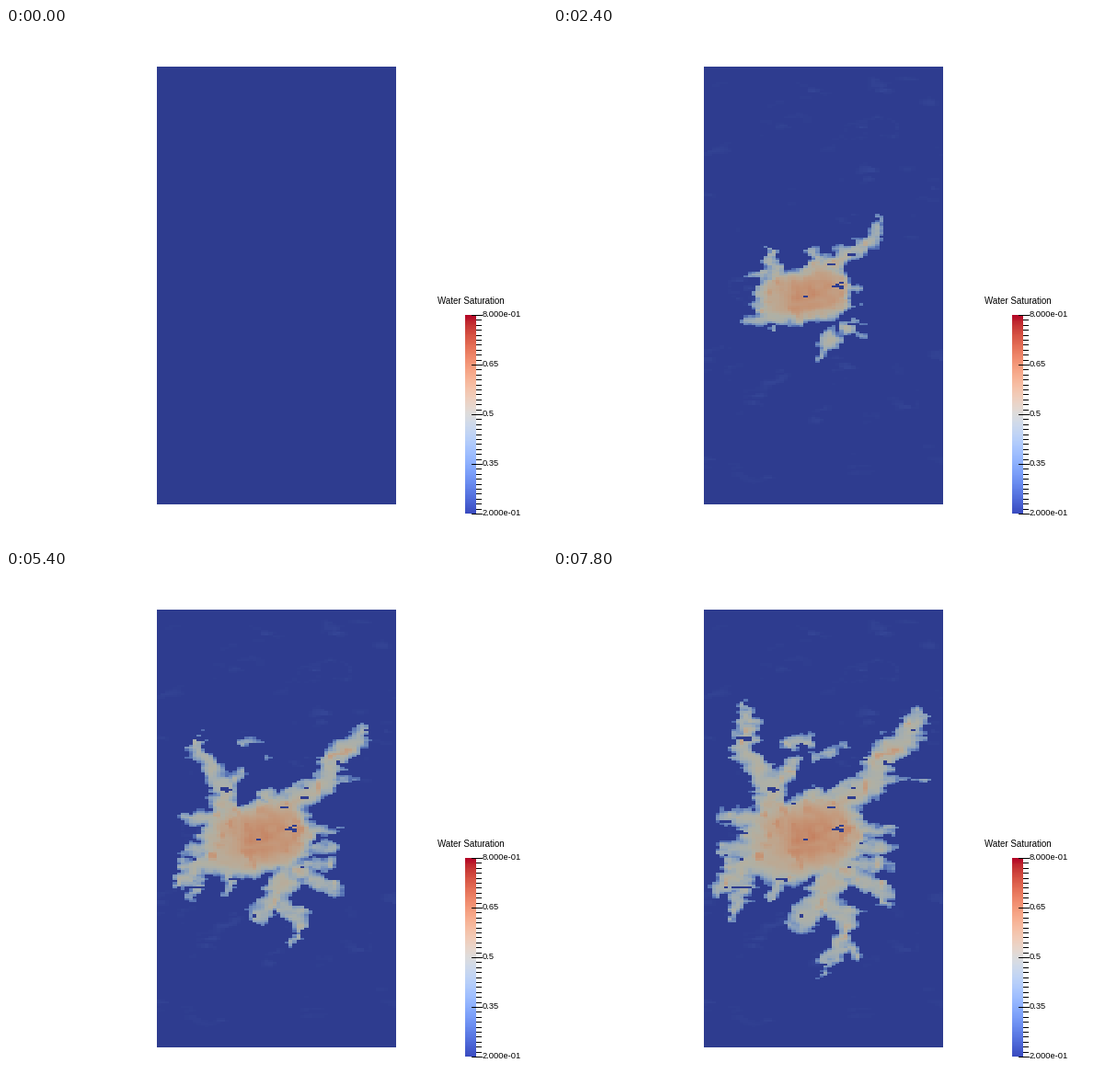
These frames come from a looping animation (588x560 px, 8 s). A matplotlib script:

```python
import numpy as np
import matplotlib.pyplot as plt
from matplotlib.animation import FuncAnimation

W, H, DPI = 588, 560, 100
LEFT, RIGHT, TOP, BOTTOM = 164, 424, 42, 518
COLS, ROWS = 60, 220
STEP_FRAMES, FRAMES, INTERVAL = 3, 80, 100
ROCK_TINT = np.array([0.80, 0.80, 0.745])
SPREAD_TIME = 6  # steps a front needs to widen to its branch's radius

# Flow paths: radius in pixels, then (x, y, step of arrival) along the way.
BRANCHES = [
    (29, [(295, 287, 0), (248, 295, 1.5)]),
    (12, [(296, 262, 2), (350, 226, 5), (356, 200, 9), (382, 184, 13), (400, 157, 23)]),
    (3, [(355, 228, 8), (402, 226, 22)]),
    (8, [(292, 262, 2), (286, 246, 4)]),
    (12, [(240, 268, 4), (234, 230, 9), (210, 196, 14), (209, 146, 25)]),
    (9, [(240, 236, 13), (262, 208, 20)]),
    (7, [(258, 186, 17), (275, 184, 18)]),
    (5, [(284, 204, 17), (316, 190, 23)]),
    (11, [(238, 312, 5), (200, 324, 9), (184, 345, 19)]),
    (9, [(208, 340, 12), (194, 378, 25)]),
    (7, [(242, 325, 7), (238, 356, 20)]),
    (12, [(304, 335, 3), (286, 364, 9), (268, 382, 20)]),
    (9, [(303, 365, 8), (318, 372, 10), (314, 402, 17), (295, 435, 25)]),
    (7, [(318, 402, 18), (331, 422, 25)]),
    (8, [(318, 326, 4), (350, 341, 10), (366, 362, 24)]),
]
# Side fingers follow the horizontal layers.
BRANCHES += [(6, [(320, y, 4), (346, y, 10), (368, y, 24)]) for y in (283, 301, 320)]
BRANCHES += [(8, [(230, y, 5), (205, y, 10), (182, y, 24)]) for y in (267, 303)]

rng = np.random.default_rng(10)


def noise(height, width):
    """Random field with features of the given size in cells."""
    field = rng.normal(size=(ROWS, COLS))
    for axis, size in ((0, height), (1, width)):
        for _ in range(2):
            field = np.mean([np.roll(field, k, axis) for k in range(size)], axis=0)
    return (field - field.mean()) / field.std()


def sample(branch):
    """Closely spaced rows of x, y, arrival and radius along a branch."""
    radius, stops = branch
    knots = np.arange(len(stops))
    s = np.linspace(0, knots[-1], 12 * knots[-1] + 1)
    x, y, arrival = (np.interp(s, knots, column) for column in zip(*stops))
    return np.column_stack([x, y, arrival, np.full(len(s), radius)])


xs = LEFT + (np.arange(COLS) + 0.5) * (RIGHT - LEFT) / COLS
ys = TOP + (np.arange(ROWS) + 0.5) * (BOTTOM - TOP) / ROWS
X, Y = np.meshgrid(xs, ys)
warped_x, warped_y = X + 2.5 * noise(2, 3), Y + 1.2 * noise(2, 2)
trail = np.vstack([sample(b) for b in BRANCHES])
distances = [np.hypot(warped_x - x, warped_y - y) for x, y, *_ in trail]

core = np.exp(-((X - 283) / 46) ** 2 - ((Y - 287) / 36) ** 2)
roughness = 1.6 * noise(3, 2)
dry = noise(2, 3) > 1.85 + 0.8 * core
hot = np.clip(noise(4, 2) - 0.7, 0, 1)
grain = 0.014 * noise(3, 2)
mottle = 0.014 * np.clip(noise(8, 6) - 0.7, 0, 1.2) * np.clip(noise(2, 3), 0, 1.5)


def depth_behind_front(step):
    """Pixels each cell lies inside the flooded zone, negative outside."""
    depth = np.full(X.shape, -99.0)
    for (_, _, arrival, radius), distance in zip(trail, distances):
        if step > arrival:
            front = radius * np.cbrt((step - arrival) / SPREAD_TIME)
            np.maximum(depth, front - distance, out=depth)
    return depth + roughness


def saturation(step):
    """Normalised water saturation of every cell."""
    if step == 0:
        return np.zeros(X.shape)
    depth = depth_behind_front(step)
    ramp = 1 - np.exp(-np.maximum(depth, 0) / 4.5)
    warm = (0.16 + 0.04 * step / 26) * core + 0.14 * hot * (1 - core)
    wet = 0.12 + ramp * (0.39 + warm + grain)
    return np.where((depth > 0) & ~dry, wet, mottle * min(1, step / 4))


def colours(step):
    return plt.cm.coolwarm(saturation(step))[..., :3] * ROCK_TINT


steps = [colours(k) for k in range((FRAMES - 1) // STEP_FRAMES + 1)]

fig = plt.figure(figsize=(W / DPI, H / DPI), dpi=DPI, facecolor="white")
ax = fig.add_axes([0, 0, 1, 1])
ax.axis("off")
view = dict(aspect="auto", interpolation="nearest")
rock = ax.imshow(steps[0], extent=(LEFT, RIGHT, BOTTOM, TOP), **view)

# Colour bar with its scale
ax.imshow(np.linspace(1, 0, 216)[:, None], cmap="coolwarm", vmin=0, vmax=1,
          extent=(499, 511, 528, 312), **view)
SCALE_TOP, SCALE_BOTTOM = 311, 527
for i, y in enumerate(np.linspace(SCALE_TOP, SCALE_BOTTOM, 41)):
    x0, x1 = (506, 517) if i % 10 == 0 else (511, 516)
    ax.plot([x0, x1], [round(y) + 0.5] * 2, color="black", lw=0.72,
            solid_capstyle="butt", antialiased=False)
font = dict(family="Liberation Sans", va="baseline")
labels = ["8.000e-01", "0.65", "0.5", "0.35", "2.000e-01"]
for label, y in zip(labels, np.linspace(SCALE_TOP, SCALE_BOTTOM, len(labels))):
    ax.text(518, y + 3.5, label, size=6.7, **font)
ax.text(505.5, 300, "Water Saturation", size=7, ha="center", **font)
ax.set_xlim(0, W)
ax.set_ylim(H, 0)


def update(frame):
    rock.set_data(steps[frame // STEP_FRAMES])
    return [rock]


anim = FuncAnimation(fig, update, frames=FRAMES, interval=INTERVAL,
                     repeat=True, repeat_delay=0)
plt.show()
```
